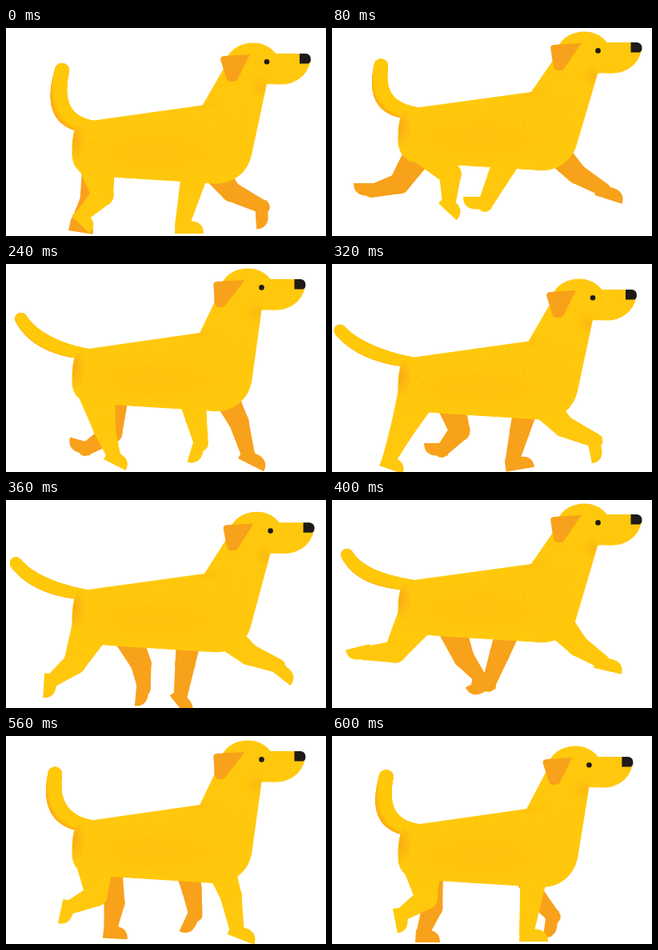
These frames come from a looping animation (400x260 px, 640 ms). An HTML page with a canvas:

```html
<!DOCTYPE html>
<html lang="en">
<head>
<meta charset="utf-8">
<title>Running dog</title>
<style>
  html, body { margin: 0; width: 100%; height: 100%; overflow: hidden; background: #fff; }
  canvas { display: block; width: 400px; height: 260px; }
</style>
</head>
<body>
<canvas id="stage"></canvas>
<script>
const STEP = 40, STEPS = 16;
const YELLOW = '#ffc80c', ORANGE = '#f8a11b', INK = '#1d1a18';

const canvas = document.getElementById('stage');
const ratio = window.devicePixelRatio || 1;
canvas.width = 400 * ratio;
canvas.height = 260 * ratio;
const ctx = canvas.getContext('2d');
ctx.scale(ratio, ratio);

// Key poses of a stride: step, heel x, heel y, sole angle, knee bend.
const FRONT = [
  [0, 211, 257, 0, 0],
  [2, 200, 211, 180, 0],
  [3.6, 229, 205, 157, 0],
  [6, 237, 213, 107, 0],
  [7, 292, 217, 92, 9],
  [8, 318, 214, 79, 8],
  [9.7, 328, 209, 16, 5],
  [12, 309, 222, 22, 2],
  [13.6, 290, 243, 27, -4],
  [15, 234, 257, 0, 0]
];
const NEAR_HIND = [
  [0, 82, 235, 44, -20],
  [2, 133, 219, 43, -16],
  [6, 122, 244, 27, 3],
  [8, 59, 252, 19, 0],
  [10, 47, 180, 166, -21],
  [12, 62, 184, 141, -25],
  [15, 76, 216, 79, -23]
];
const FAR_HIND = [
  [0, 78, 253, 9, -7],
  [2, 58, 194, 180, -16],
  [6, 110, 225, 196, -22],
  [8, 146, 224, 180, -20],
  [10, 174, 230, 13, 6],
  [12, 150, 238, 14, 0],
  [15, 104, 258, 0, -10]
];

// Smooth loop through rows of [step, ...values].
function sample(rows, t) {
  t %= STEPS;
  const n = rows.length;
  const row = i => rows[(i + n) % n];
  const time = i => row(i)[0] + Math.floor(i / n) * STEPS;
  let i = n - 1;
  while (rows[i][0] > t) i--;
  const span = time(i + 1) - time(i);
  const u = (t - time(i)) / span;
  const slope = (k, c) => (row(k + 1)[c] - row(k - 1)[c]) / (time(k + 1) - time(k - 1));
  return row(i).slice(1).map((a, j) => {
    const c = j + 1, b = row(i + 1)[c];
    const m0 = slope(i, c) * span, m1 = slope(i + 1, c) * span;
    return a + u * (m0 + u * (3 * (b - a) - 2 * m0 - m1 + u * (2 * (a - b) + m0 + m1)));
  });
}

// Two harmonics of a cycle.
function wave(t, period, mid, c1, s1 = 0, c2 = 0, s2 = 0) {
  const a = t / period * 2 * Math.PI;
  return mid + c1 * Math.cos(a) + s1 * Math.sin(a) + c2 * Math.cos(2 * a) + s2 * Math.sin(2 * a);
}

function random(seed) {
  return () => (seed = (seed * 16807) % 2147483647) / 2147483647;
}
const rnd = random(41);
const grain = Array.from({ length: 600 }, () => {
  const x = 92 + rnd() * 205;
  return [x, 150 - (x - 195) * 0.08 + (rnd() + rnd() - 1) * 44];
});

function disc(x, y, r) {
  ctx.beginPath();
  ctx.arc(x, y, r, 0, 7);
  ctx.fill();
}

// Limb segment with round ends.
function taper(x0, y0, r0, x1, y1, r1) {
  const len = Math.hypot(x1 - x0, y1 - y0) || 1;
  const nx = (y1 - y0) / len, ny = (x0 - x1) / len;
  disc(x0, y0, r0);
  disc(x1, y1, r1);
  ctx.beginPath();
  ctx.moveTo(x0 + nx * r0, y0 + ny * r0);
  ctx.lineTo(x1 + nx * r1, y1 + ny * r1);
  ctx.lineTo(x1 - nx * r1, y1 - ny * r1);
  ctx.lineTo(x0 - nx * r0, y0 - ny * r0);
  ctx.fill();
}

function leg(pose, color, hx, hy, [hipR, kneeR, ankleR], split, paw) {
  const [sx, sy, angle, bend] = pose;
  const dx = Math.cos(angle * Math.PI / 180), dy = Math.sin(angle * Math.PI / 180);
  // Along the sole and away from it.
  const at = (a, b) => [sx + dx * a + dy * b, sy + dy * a - dx * b];
  const [ax, ay] = at(9, 10);
  const vx = ax - hx, vy = ay - hy, len = Math.hypot(vx, vy);
  const kx = hx + vx * split - vy / len * bend;
  const ky = hy + vy * split + vx / len * bend;
  ctx.fillStyle = color;
  taper(hx, hy, hipR, kx, ky, kneeR);
  taper(kx, ky, kneeR, ax, ay, ankleR);
  ctx.beginPath();
  ctx.moveTo(...at(0, 0));
  ctx.lineTo(...at(paw, 0));
  ctx.quadraticCurveTo(...at(paw, 14), ...at(paw - 14, 15.5));
  ctx.lineTo(...at(1, 15.5));
  ctx.fill();
}

function frontLeg(t, color, by, radii) {
  const hip = Math.max(222, wave(t - 11.2, STEPS, 250, 40));
  leg(sample(FRONT, t), color, hip, 174 + by, radii, 0.47, 36);
}

function tail(t, by) {
  const x = wave(t, STEPS, 40, 30), y = wave(t, STEPS, 58, -15, 0, 10);
  const ax = x + (47 - x) * 0.55, ay = y + 20 + x * 0.4;
  const bx = 112, base = 124 + by;
  const cx = bx - 42, cy = base - 3;
  const r = 7 + x * 0.03;
  const bezier = (a, b, c, d, s) =>
    a * (1 - s) ** 3 + 3 * b * s * (1 - s) ** 2 + 3 * c * s * s * (1 - s) + d * s ** 3;
  // Layers shift inwards, leaving a soft darker rim outside.
  for (let k = 0; k <= 4; k++) {
    ctx.fillStyle = `rgb(255,${172 + 7 * k},${22 - 3 * k})`;
    for (let s = 0; s <= 1; s += 0.01) {
      const swell = Math.sin(Math.PI * s);
      const shift = k * swell * x / 70;
      disc(bezier(x, ax, cx, bx, s) + shift, bezier(y, ay, cy, base, s) - shift * 0.6,
        r + swell * 1.6 - s * 1.5 - shift * 0.5);
    }
  }
}

function glow(x, y, rx, ry, alpha) {
  ctx.save();
  ctx.translate(x, y);
  ctx.scale(rx, ry);
  const g = ctx.createRadialGradient(0, 0, 0, 0, 0, 1);
  g.addColorStop(0, `rgba(245,150,25,${alpha})`);
  g.addColorStop(1, 'rgba(245,150,25,0)');
  ctx.fillStyle = g;
  ctx.fillRect(-1, -1, 2, 2);
  ctx.restore();
}

function body(by, hx, hy) {
  const p = new Path2D();
  p.moveTo(103, 117 + by);
  p.lineTo(246 + hx / 2, 97 + by);
  p.lineTo(272 + hx, 52 + hy);
  p.lineTo(277 + hx, 37 + hy);
  p.bezierCurveTo(283 + hx, 25 + hy, 296 + hx, 19 + hy, 309 + hx, 19 + hy);
  p.bezierCurveTo(321 + hx, 19 + hy, 330 + hx, 24 + hy, 337 + hx, 32.5 + hy);
  p.lineTo(375 + hx, 32.5 + hy);
  p.lineTo(380 + hx, 41 + hy);
  p.bezierCurveTo(376 + hx, 59 + hy, 362 + hx, 70 + hy, 343 + hx, 70 + hy);
  p.lineTo(325.5 + hx, 69.5 + hy);
  p.lineTo(306.5, 158 + by);
  p.bezierCurveTo(302, 180 + by, 284, 195 + by, 260, 194 + by);
  p.lineTo(140, 186.5 + by);
  p.lineTo(98, 183 + by);
  p.bezierCurveTo(86, 175 + by, 83, 168 + by, 83, 155 + by);
  p.bezierCurveTo(83, 138 + by, 85, 128 + by, 89, 121 + by);
  p.closePath();
  ctx.fillStyle = ctx.strokeStyle = YELLOW;
  ctx.lineWidth = 1.2;
  ctx.fill(p);
  ctx.stroke(p);

  ctx.save();
  ctx.clip(p);
  glow(84, 140 + by, 16, 28, 0.6);
  glow(319 + hx, 74 + hy, 12, 14, 0.3);
  glow(248 + hx / 2, 97 + by, 24, 8, 0.15);
  glow(185, 155 + by, 100, 34, 0.12);
  ctx.fillStyle = 'rgba(245,165,20,.22)';
  for (const [x, y] of grain) ctx.fillRect(x, y + by, 1.2, 1.2);
  ctx.restore();
}

function face(hx, hy, swing) {
  ctx.save();
  ctx.translate(hx, hy);
  const top = swing * 0.3;
  ctx.fillStyle = ORANGE;
  ctx.beginPath();
  ctx.moveTo(268.5 + top, 41);
  ctx.quadraticCurveTo(267 + top, 36, 272 + top, 35);
  ctx.lineTo(305, 33);
  ctx.lineTo(290 + swing, 63);
  ctx.quadraticCurveTo(288 + swing, 67, 284 + swing, 67);
  ctx.lineTo(281 + swing, 67);
  ctx.quadraticCurveTo(276 + swing, 67, 275 + swing, 61);
  ctx.fill();

  ctx.fillStyle = INK;
  disc(326, 42.3, 3.3);
  ctx.beginPath();
  ctx.moveTo(367, 32);
  ctx.lineTo(375, 32);
  ctx.quadraticCurveTo(381, 33, 381, 39);
  ctx.quadraticCurveTo(381, 43, 378, 44.5);
  ctx.lineTo(367, 44.5);
  ctx.fill();
  ctx.restore();
}

function draw(t) {
  const bounce = STEPS / 2;
  const by = wave(t, bounce, -11.1, 8.7, -3, 2.4, 2.7);
  const hx = wave(t, bounce, 0, 0, 6.5);
  const hy = wave(t, bounce, -11.2, 9, -0.5, 2.2, 1.5);
  const swing = wave(t, bounce, -6.5, 6.5, 1.5, 0, -3);
  const farHip = wave(t - 9, STEPS, 130, 15);

  ctx.fillStyle = '#fff';
  ctx.fillRect(0, 0, 400, 260);
  leg(sample(FAR_HIND, t), ORANGE, farHip, 160 + by * 0.9, [20, 13, 8], 0.63, 31);
  frontLeg(t + STEPS / 2 - 0.4, ORANGE, by, [16, 12.5, 8.5]);
  tail(t, by);
  leg(sample(NEAR_HIND, t), YELLOW, 110.5, 155 + by * 0.9, [27, 14, 8.5], 0.63, 31);
  frontLeg(t, YELLOW, by, [18, 13.5, 9]);
  body(by, hx, hy);
  face(hx, hy, swing);
}

const start = performance.now();
function tick() {
  draw(Math.floor((performance.now() - start) / STEP) % STEPS);
  requestAnimationFrame(tick);
}
tick();
</script>
</body>
</html>
```
